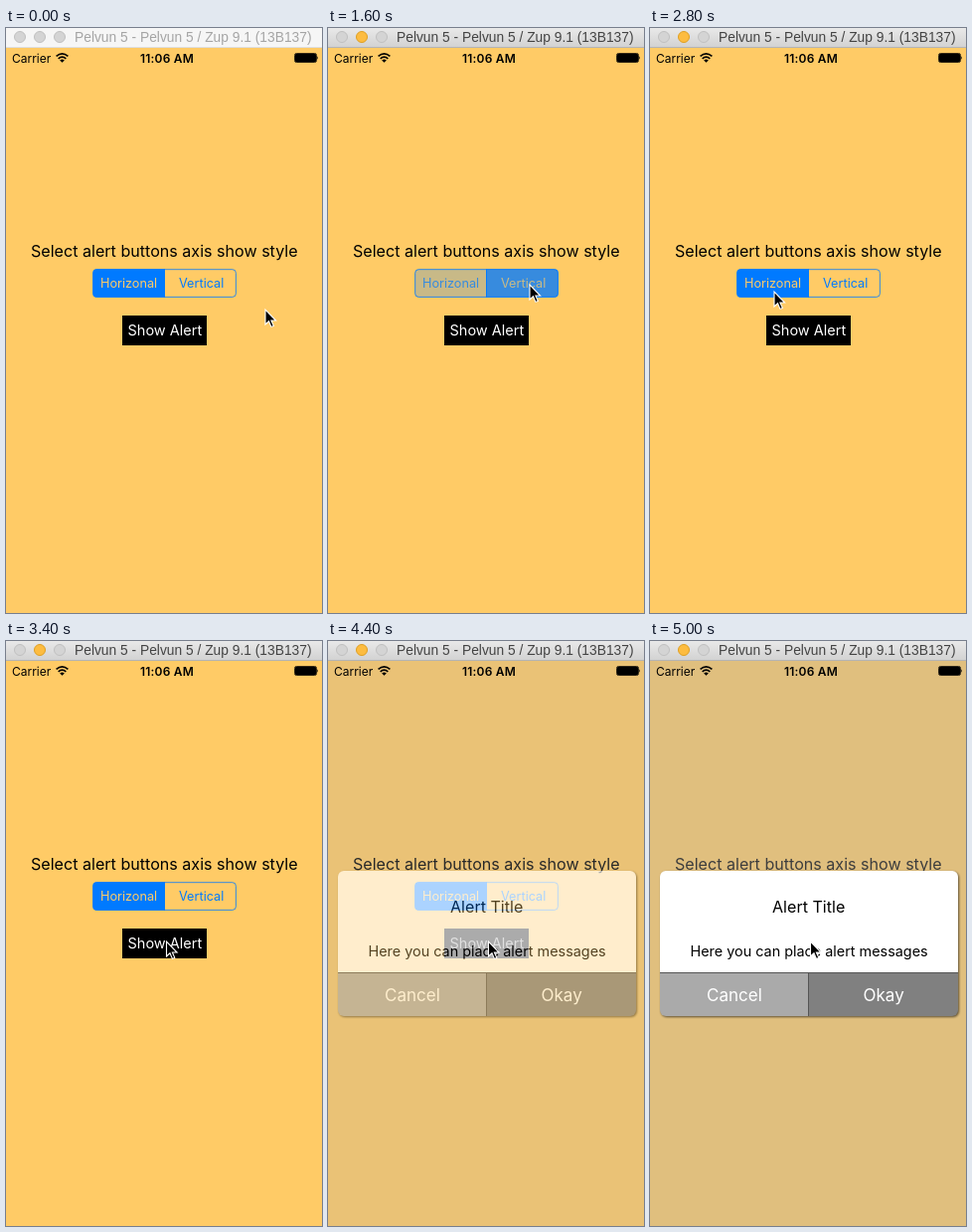
An HTML page that plays this animation: 318 by 588 pixels, repeating every 5100 ms.

```html
<!DOCTYPE html>
<html lang="en">
<head>
<meta charset="utf-8">
<title>Alert demo</title>
<style>
  html, body { margin: 0; width: 100%; height: 100%; overflow: hidden; background: #ffcb66; }
  svg { display: block; width: 318px; height: 588px; font-family: Inter, Roboto, sans-serif; }
  .bar { font: 13.8px "Liberation Sans", Arial, sans-serif; }
  .status { font-size: 12px; }
  .time { font-size: 12px; font-weight: 600; letter-spacing: .2px; }
  .seg { font-size: 12.7px; }
  .show { font-size: 14.5px; }
  .label { font-size: 16.1px; }
  .msg { font-size: 14.4px; }
  .btn { font-size: 17px; fill: #fff; }
  #alert { filter: drop-shadow(1px 1px 1px #0009); }
</style>
</head>
<body>
<svg viewBox="0 0 318 588">
  <defs>
    <linearGradient id="chrome" x2="0" y2="1"><stop stop-color="#e9e9e9"/><stop offset="1" stop-color="#d1d1d1"/></linearGradient>
    <clipPath id="round"><rect x="10" y="231" width="300" height="146" rx="6"/></clipPath>
    <clipPath id="pill"><rect x="87.3" y="242.3" width="144.5" height="28.5" rx="4"/></clipPath>
  </defs>

  <rect width="318" height="588" fill="#ffcb66"/>
  <text class="label" x="25" y="229.6">Select alert buttons axis show style</text>

  <g clip-path="url(#pill)" fill="#007aff">
    <rect id="leftFill" x="87" y="242" width="73" height="29"/>
    <rect id="rightFill" x="160" y="242" width="72" height="29"/>
    <rect x="159" y="242" width="1" height="29"/>
  </g>
  <rect x="87.7" y="242.7" width="143.7" height="27.7" rx="3.6" fill="none" stroke="#007aff" stroke-width=".8"/>
  <text class="seg" id="leftText" x="95" y="261">Horizonal</text>
  <text class="seg" id="rightText" x="174" y="261">Vertical</text>

  <rect x="117" y="289" width="85" height="30"/>
  <text class="show" id="showText" x="122.5" y="309.3" fill="#fff">Show Alert</text>

  <g id="modal">
    <rect y="20" width="318" height="568" fill="#aaa" opacity=".36"/>
    <g id="alert">
      <g clip-path="url(#round)">
        <rect x="10" y="231" width="300" height="103" fill="#fff"/>
        <rect x="10" y="334" width="149" height="43" fill="#aaa"/>
        <rect x="160" y="334" width="150" height="43" fill="#808080"/>
        <path d="M10 333.5H310M159.5 334V377" stroke="#555"/>
      </g>
    </g>
    <text class="label" x="123" y="272.6">Alert Title</text>
    <text class="msg" x="40.5" y="316.6">Here you can place alert messages</text>
    <text class="btn" x="57" y="362">Cancel</text>
    <text class="btn" x="214.5" y="362">Okay</text>
  </g>

  <text class="status" x="6" y="35">Carrier</text>
  <text class="time" x="135" y="35">11:06 AM</text>
  <g fill="none" stroke="#000" stroke-width="1.7">
    <path d="M50.6 28.4Q56.5 23.4 62.4 28.4M52.7 30.8Q56.5 27.6 60.3 30.8"/>
    <path d="M54.2 32.4Q56.5 30.6 58.8 32.4L56.5 34.8Z" fill="#000" stroke="none"/>
  </g>
  <rect x="290.5" y="25.5" width="22" height="9" rx="1.8" fill="none" stroke="#000" stroke-width=".8"/>
  <rect x="291" y="26" width="21" height="8" rx=".8"/>
  <path d="M313.2 28.3q1.6 1.7 0 3.4z"/>

  <rect id="bar" width="318" height="20"/>
  <rect id="barLine" y="19" width="318" height="1"/>
  <g fill="#d4d4d4" stroke="#c0c0c0">
    <circle cx="14" cy="9" r="5.5"/>
    <circle id="amber" cx="34" cy="9" r="5.5"/>
    <circle cx="54" cy="9" r="5.5"/>
  </g>
  <text class="bar" id="barText" x="69" y="14">Pelvun 5 - Pelvun 5 / Zup 9.1 (13B137)</text>

  <path id="cursor" d="M0 0V15L3.5 11.8L5.9 17.4L8.3 16.4L5.9 11H10.6Z" stroke="#fff" stroke-width="1.1"/>
</svg>

<script>
const LOOP = 5100, STEP = 100;
const BLUE = [0, 122, 255], SAND = [255, 203, 102];
// Cursor stops: time, x, y
const PATH = [[0, 261, 283], [600, 203, 258], [1600, 203, 258], [2100, 125, 265],
              [2800, 125, 265], [3400, 161.5, 302], [LOOP, 161.5, 302]];

const $ = id => document.getElementById(id);
const set = (id, attrs) => {
  for (const k in attrs) $(id).setAttribute(k, attrs[k]);
};
const ramp = (t, from, to) => Math.min(1, Math.max(0, (t - from) / (to - from)));
const ease = u => u * u * (3 - 2 * u);
const lerp = (a, b, u) => a + (b - a) * u;
const mix = (a, b, u) => `rgb(${a.map((v, i) => Math.round(lerp(v, b[i], u)))})`;
const within = (t, from, to) => t >= from && t < to;

function draw(t) {
  const i = PATH.findIndex(p => t < p[0]);
  const [a, b] = [PATH[i - 1], PATH[i]];
  const u = ease(ramp(t, a[0], b[0]));
  set('cursor', { transform: `translate(${lerp(a[1], b[1], u)} ${lerp(a[2], b[2], u)})` });

  const active = t >= 1000;
  set('bar', { fill: active ? 'url(#chrome)' : '#f6f6f6' });
  set('barLine', { fill: active ? '#b4b4b4' : '#dedede' });
  set('barText', { fill: active ? '#444' : '#a5a5a5' });
  set('amber', active ? { fill: '#fdbc40', stroke: '#dfa023' } : { fill: '#d4d4d4', stroke: '#c0c0c0' });

  // 0 = left segment selected, 1 = right
  const side = ease(ramp(t, 1460, 1660)) - ease(ramp(t, 2460, 2660));
  const pressRight = within(t, 1400, 1600) ? .2 : 0;
  const pressLeft = within(t, 2300, 2500) ? .2 : 0;
  set('leftFill', { opacity: Math.max(1 - side, pressLeft) });
  set('rightFill', { opacity: Math.max(side, pressRight) });
  set('leftText', { fill: mix(SAND, BLUE, side) });
  set('rightText', { fill: mix(BLUE, SAND, side) });

  const pressed = ramp(t, 3900, 4100) - ramp(t, 4300, 4500);
  set('showText', { opacity: 1 - .72 * pressed });
  set('modal', { opacity: ease(ramp(t, 4288, 4470)) });
}

function tick(now) {
  draw(Math.floor(now % LOOP / STEP) * STEP);
  requestAnimationFrame(tick);
}
draw(0);
requestAnimationFrame(tick);
</script>
</body>
</html>
```
